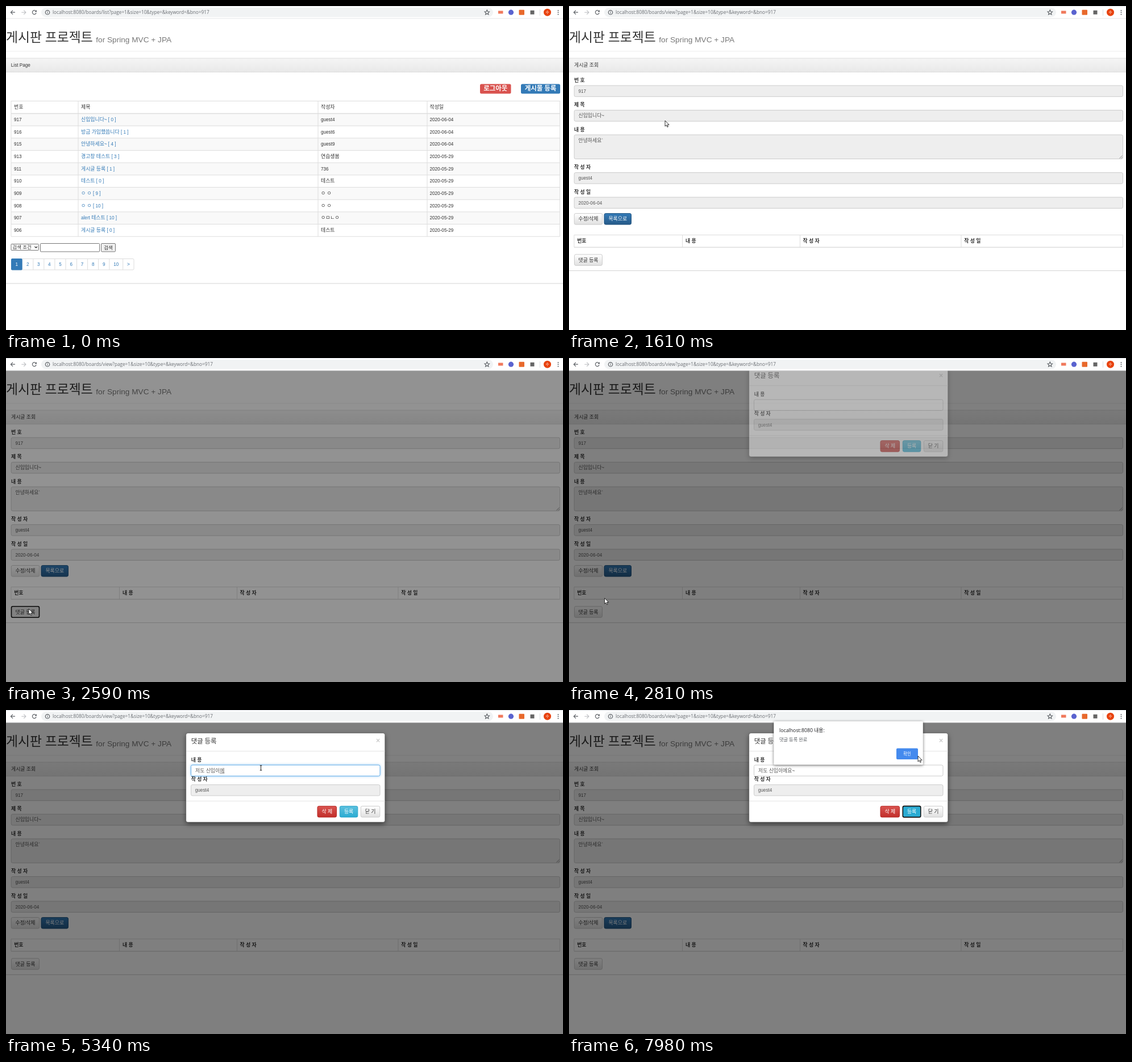
Recreate the animation shown at these times as an HTML page. Size 980 by 571 pixels, loop 8000 ms.

```html
<!DOCTYPE html>
<html lang="ko">
<head>
<meta charset="utf-8">
<title>게시판</title>
<style>
html, body { margin: 0; width: 100%; height: 100%; overflow: hidden; background: #fff; }
svg { display: block; width: 980px; height: 571px; }
text { font: 8.17px "Liberation Sans", "Noto Sans CJK KR", sans-serif; fill: #333; }
.ko { font-size: 1.087em; font-family: "Noto Sans CJK KR", sans-serif; }
.ui { font-family: "Open Sans", "Noto Sans CJK KR", sans-serif; }
.b { font-weight: 700; }
.mid { text-anchor: middle; }
</style>
</head>
<body>
<svg id="stage" viewBox="0 0 980 571" xmlns="http://www.w3.org/2000/svg"></svg>
<script>
const stage = document.getElementById('stage');
const $ = id => document.getElementById(id);

// Hangul runs are set slightly larger so that a syllable is one em wide.
const ko = s => s.replace(/&/g, '&amp;').replace(/>/g, '&gt;')
  .replace(/[ㄱ-힣]+/g, '<tspan class="ko">$&</tspan>');
const text = (x, y, s, o = {}) =>
  `<text x="${x}" y="${y}" class="${o.cls || ''}" id="${o.id || ''}" style="${o.size ? `font-size:${o.size}px;` : ''}${o.fill ? `fill:${o.fill};` : ''}${o.css || ''}">${ko(s)}</text>`;
const rect = (x, y, w, h, fill, stroke = 'none', rx = 0, more = '') =>
  `<rect x="${x}" y="${y}" width="${w}" height="${h}" fill="${fill}" stroke="${stroke}" rx="${rx}" ${more}/>`;
const hline = (x1, x2, y, color = '#ddd', w = 1) =>
  `<path d="M${x1} ${y}H${x2}" stroke="${color}" stroke-width="${w}"/>`;
const vline = (x, y1, y2, color = '#ddd') => `<path d="M${x} ${y1}V${y2}" stroke="${color}"/>`;
const group = (id, body, more = '') => `<g id="${id}" ${more}>${body}</g>`;
const button = (x, y, w, label, fill, border, color, id = '') =>
  rect(x, y, w, 19.5, fill, border, 2.5, id && `id="${id}"`) +
  text(x + w / 2, y + 12.8, label, { cls: 'mid', fill: color });
const field = (x, y, w, h, value) =>
  rect(x, y, w, h, '#eee', '#ccc', 2.5) + text(x + 7.3, y + 12.7, value, { fill: '#555' });

const LINK = '#337ab7', ROW = 21.67, TOP = 189.5;
const WRITER = 'guest4';
const URL_HEAD = 'localhost:8080/boards/', URL_TAIL = '?page=1&size=10&type=&keyword=&bno=917';

const posts = [
  [917, '신입입니다~ [ 0 ]', WRITER], [916, '방금 가입했씁니다 [ 1 ]', 'guest6'],
  [915, '안녕하세요~ [ 4 ]', 'guest9'], [913, '경고창 테스트 [ 3 ]', '연습생봄'],
  [911, '게시글 등록 [ 1 ]', '736'], [910, '테스트 [ 0 ]', '테스트'],
  [909, 'ㅇ ㅇ [ 9 ]', 'ㅇ ㅇ'], [908, 'ㅇ ㅇ [ 10 ]', 'ㅇ ㅇ'],
  [907, 'alert 테스트 [ 10 ]', 'ㅇㅁㄴㅇ'], [906, '게시글 등록 [ 0 ]', '테스트']
];

const gradients = {
  head: ['#f5f5f5', '#e8e8e8'], plain: ['#fff', '#e0e0e0'], blue: [LINK, '#265a88'],
  red: ['#d9534f', '#c12e2a'], cyan: ['#5bc0de', '#2aabd2']
};
const defs = () => '<defs>' + Object.entries(gradients).map(([id, [a, b]]) =>
  `<linearGradient id="${id}" x2="0" y2="1"><stop stop-color="${a}"/><stop offset="1" stop-color="${b}"/></linearGradient>`).join('') +
  `<clipPath id="view">${rect(0, 22, 980, 549, '#fff')}</clipPath></defs>`;

function browserBar() {
  const dark = 'fill="none" stroke="#5f6368" stroke-width="1.2"';
  return rect(0, 0, 980, 22, '#fff') + rect(0, 0, 980, 1, '#dee1e6') + hline(0, 980, 22, '#e4e5e7') +
    rect(62, 3, 795, 16.5, '#f1f3f4', 'none', 8.2) +
    `<path d="M16 11.2H8.6M12 7.6L8.4 11.2L12 14.8" ${dark} stroke="#444"/>` +
    `<path d="M27.3 11.2H34.7M31.3 7.6L34.9 11.2L31.3 14.8" fill="none" stroke="#bbbdc0" stroke-width="1.1"/>` +
    `<g id="reload"><path d="M52.6 8.9A3.5 3.5 0 1 0 53.2 12.3" ${dark}/><path d="M54 7V10.6H50.4Z" fill="#5f6368"/></g>` +
    `<path id="halt" d="M46.4 7.9L53 14.5M53 7.9L46.4 14.5" ${dark}/>` +
    `<circle cx="73" cy="11.3" r="3.7" ${dark} stroke-width=".9"/><path d="M73 10.7V13.4M73 9V10" stroke="#5f6368"/>` +
    text(82, 14.3, '', { id: 'url', cls: 'ui', size: 8.22, fill: '#6a6e73' }) +
    `<path d="M846.3 7L847.5 9.8L850.5 10.1L848.2 12.1L848.9 15.1L846.3 13.5L843.7 15.1L844.4 12.1L842.1 10.1L845.1 9.8Z" ${dark} stroke-width=".9"/>` +
    rect(866, 8.5, 8.5, 5, '#f0795c') + '<circle cx="888.5" cy="11.2" r="4.6" fill="#5a63cf"/>' +
    rect(902.5, 6.8, 9.5, 9, '#e8692c', 'none', 1) + rect(922.5, 7.8, 7, 7, '#666') +
    vline(939.5, 6, 17, '#dcdde0') + '<circle cx="952.5" cy="11.2" r="6.5" fill="#e8430f"/>' +
    text(952.5, 13.4, '수', { cls: 'mid', size: 5.5, fill: '#fff' }) +
    [7.9, 11.3, 14.7].map(y => `<circle cx="971.5" cy="${y}" r="1" fill="#5f6368"/>`).join('');
}

const pageHead = () =>
  text(0, 63.3, '게시판 프로젝트', { size: 21, css: 'font-weight:300' }) +
  text(158.3, 64.4, 'for Spring MVC + JPA', { size: 13.65, fill: '#777' }) +
  hline(0, 980, 79.8, '#eee') + rect(0, 92, 980, 24.5, 'url(#head)') +
  hline(0, 980, 92, '#ddd') + hline(0, 980, 116.5, '#ddd');

function listPage() {
  const end = TOP + ROW * posts.length;
  let s = text(8.8, 107, 'List Page') +
    rect(834, 137.5, 54.5, 17, '#d9534f', 'none', 2.5) + rect(906, 137.5, 69, 17, LINK, 'none', 2.5) +
    text(861.3, 149.2, '로그아웃', { cls: 'b mid', size: 10.5, fill: '#fff' }) +
    text(940.5, 149.2, '게시물 등록', { cls: 'b mid', size: 10.5, fill: '#fff' });
  ['번호', '제목', '작성자', '작성일'].forEach((h, i) => s += text([14, 132, 554, 745.5][i], 180.6, h));
  posts.forEach(([no, title, writer], i) => {
    const y = TOP + ROW * i, base = y + 13.6;
    s += rect(9, y, 965.5, ROW, '#fff', 'none', 0, `id="row${i}"`) + hline(9, 974.5, y, '#ddd', i ? 1 : 1.4) +
      text(14, base, '' + no) + text(132, base, title, { fill: LINK, id: 'link' + i }) +
      text(554, base, writer) + text(745.5, base, i < 3 ? '2020-06-04' : '2020-05-29');
  });
  s += hline(9, 974.5, 167.5) + hline(9, 974.5, end) +
    [9, 127, 549, 741, 974.5].map(x => vline(x, 167, end)).join('');
  s += rect(9, 419.5, 48.5, 11, '#fff', '#767676', 1) + text(11.5, 428, '검색 조건', { size: 7.78 }) +
    '<path d="M50.5 423.8L52.8 426.2L55.1 423.8" fill="none" stroke="#222" stroke-width="1.2"/>' +
    rect(60.5, 418.5, 104, 14.5, '#fff', '#767676', 1) + rect(167.5, 418.5, 25, 14.5, '#efefef', '#767676', 1.5) +
    text(180, 428.6, '검색', { cls: 'mid', size: 7.78 });
  const cuts = [9, 28.7, 47.8, 66.8, 85.9, 105, 124.5, 143.6, 162.7, 181.9, 205.7, 225];
  s += rect(9.5, 445.5, 215.5, 19.5, '#fff', '#ddd', 2) + cuts.slice(2, -1).map(x => vline(x, 445.5, 465)).join('') +
    rect(9, 445, 19.7, 20.4, LINK, 'none', 2);
  cuts.slice(1).forEach((x, i) => s += text((x + cuts[i]) / 2, 458, i < 10 ? '' + (i + 1) : '>',
    { cls: 'mid', fill: i ? LINK : '#fff' }));
  return s + text(9, 484, ',', { id: 'comma' }) + group('listEnd', hline(0, 980, 489, '#d4d4d4', 1.2));
}

function postPage() {
  let s = text(9, 107, '게시글 조회');
  [['번 호', 140.2, '917'], ['제 목', 183.6, '신입입니다~'], ['내 용', 227, '안녕하세요`', 42.5],
   ['작 성 자', 293.6, WRITER], ['작 성 일', 337, '2020-06-04']].forEach(([name, y, value, h = 19.5]) =>
    s += text(9, y - 6.4, name, { cls: 'b' }) + field(9.2, y, 965.3, h, value));
  s += '<path d="M968.5 268.5L973.5 263.5M971.3 268.5L973.5 266.3" stroke="#777" stroke-width=".8"/>' +
    button(9.3, 365.6, 49.5, '수정/삭제', 'url(#plain)', '#ccc') +
    button(62, 365.6, 47.5, '목록으로', 'url(#blue)', '#245580', '#fff') +
    hline(9, 974.5, 403.5) + hline(9, 974.5, 425.2, '#ddd', 1.5) +
    [9, 199.5, 406.5, 690, 974.5].map(x => vline(x, 403.5, 425)).join('');
  ['번호', '내 용', '작 성 자', '작 성 일'].forEach((h, i) =>
    s += text([14.2, 205, 411.5, 695.3][i], 416.8, h, { cls: 'b' }));
  return s + button(9.5, 437.8, 49, '댓글 등록', 'url(#plain)', '#ccc', '#333', 'reply') +
    hline(0, 980, 466.5, '#d4d4d4', 1.2);
}

const modal = () =>
  rect(316.7, 40.7, 350, 157, '#fff', 'rgba(0,0,0,.3)', 3.5, 'style="filter:drop-shadow(0 3px 4.5px rgba(0,0,0,.5))"') +
  text(325.7, 59.2, '댓글 등록', { size: 10.5 }) +
  text(654.7, 58.3, '×', { cls: 'b mid', size: 12.25, fill: '#ccc' }) +
  hline(317, 666.5, 72.5, '#e5e5e5') + hline(317, 666.5, 160.5, '#e5e5e5') +
  text(325.7, 90.6, '내 용', { cls: 'b' }) +
  rect(325.5, 97, 332.5, 19.3, '#fff', '#ccc', 2.5, 'id="input"') +
  text(333, 109.6, '', { id: 'typed', fill: '#555' }) +
  text(325.7, 125.1, '작 성 자', { cls: 'b' }) + field(325.5, 131.7, 332.5, 19.3, WRITER) +
  button(548, 169.4, 33.5, '삭 제', 'url(#red)', '#b92c28', '#fff') +
  button(587.3, 169.4, 31.5, '등록', 'url(#cyan)', '#28a4c9', '#fff', 'save') +
  button(624.3, 169.4, 33.5, '닫 기', 'url(#plain)', '#ccc');

const alertBox = () =>
  rect(360.3, 20, 262.5, 76.5, '#fff', 'none', 1.5, 'style="filter:drop-shadow(0 1px 2.5px rgba(0,0,0,.55))"') +
  `<text class="ui" x="370" y="38.9" style="font-size:8.75px;fill:#202124">localhost:8080 내용:</text>` +
  text(370, 55.4, '댓글 등록 완료', { cls: 'ui', size: 7.58, fill: '#5f6368' }) +
  rect(576, 67.5, 38, 19.5, '#448aee', 'none', 2) +
  text(595, 79.8, '확인', { cls: 'mid', size: 7, fill: '#fff' });

const cursors = () => group('cursor',
  '<path id="arrow" d="M0 0V10L2.3 7.9L3.9 11.4L5.5 10.7L4 7.3H7.1Z" fill="#fff" stroke="#000" stroke-width=".8"/>' +
  '<path id="hand" d="M-1 1Q0 -.6 1 1V5L5 5.7Q6.5 6.2 6.3 8L5.4 12.8H-.3L-3.6 8.5Q-3.6 6.7 -1 8Z" fill="#fff" stroke="#000" stroke-width=".9"/><path/>' +
  '<path id="beam" d="M-1.8 -4.2H1.8M0 -4.2V4.2M-1.8 4.2H1.8" stroke="#222" fill="none"/>');

stage.innerHTML = defs() + group('page', pageHead() + group('list', listPage()) + group('post', postPage())) +
  group('status', rect(-1, 559.5, 92, 13, '#dee1e6', '#c8cacd', 1) +
    text(2, 568.5, URL_HEAD + '917', { cls: 'ui', size: 6.85, fill: '#444' })) +
  rect(0, 22, 980, 549, '#000', 'none', 0, 'id="shade"') +
  group('clip', group('modal', modal()), 'clip-path="url(#view)"') +
  browserBar() + group('alert', alertBox()) + cursors();

const LOOP = 8000, TICK = 109.7;
const path = [
  [0, 928, 548], [7, 169, 202], [13, 169, 202], [19, 40, 442], [23, 40, 442], [30, 448.5, 102],
  [57, 448.5, 102], [61, 604, 173], [64, 604, 173], [67, 575, 318], [70, 607, 83], [71, 614, 81]
];
const typing = [
  [36, '제'], [37, '저'], [38, '저도'], [39, '저도 '], [40, '저도 시'], [41, '저도 신'], [42, '저도 신이'],
  [43, '저도 신입'], [44, '저도 신입이'], [45, '저도 신입잉'], [46, '저도 신입이에'], [51, '저도 신입이에요'], [55, '저도 신입이에요~']
];
const clamp = v => Math.max(0, Math.min(1, v));
const show = (id, on) => $(id).style.display = on ? '' : 'none';
const set = (id, attrs) => Object.entries(attrs).forEach(([k, v]) => $(id).setAttribute(k, v));

function cursorAt(k) {
  const i = Math.max(1, path.findIndex(p => p[0] >= k));
  const [a, x, y] = path[i - 1], [b, x2, y2] = path[i];
  const p = clamp((k - a) / (b - a)), e = p * p * (3 - 2 * p);
  return [x + (x2 - x) * e, y + (y2 - y) * e];
}

function typedAt(k) {
  const step = typing.filter(s => s[0] <= k).pop();
  if (!step) return '';
  const s = step[1];
  if (/[~ ]$/.test(s)) return ko(s);
  return ko(s.slice(0, -1)) + `<tspan text-decoration="underline">${ko(s.slice(-1))}</tspan>`;
}

let last;
function draw(t) {
  const k = Math.min(71, Math.floor((t - 175) / TICK));
  if (k === last) return;
  last = k;
  const onPost = k >= 12, [x, y] = cursorAt(k), loading = k === 11 || k === 12;

  $('url').innerHTML = ko(URL_HEAD + (k < 11 ? 'list' : 'view') + URL_TAIL);
  show('reload', !loading);
  show('halt', loading);
  show('list', !onPost);
  show('post', onPost);
  show('status', k >= 8 && !onPost);
  show('comma', k >= 10);
  set('listEnd', { transform: `translate(0 ${k >= 10 ? 11.5 : 0})` });

  const hover = k < 0 ? -1 : Math.floor((y - TOP) / ROW);
  posts.forEach((_, i) => set('row' + i, { fill: i === hover ? '#f5f5f5' : i % 2 ? '#fff' : '#f9f9f9' }));
  const linkHot = k >= 7;
  $('link0').style.fill = linkHot ? '#23527c' : LINK;
  $('link0').style.textDecoration = linkHot ? 'underline' : 'none';

  const pressed = k >= 20 && k < 24;
  set('reply', { fill: pressed ? '#e0e0e0' : 'url(#plain)', stroke: pressed ? '#111' : '#ccc', 'stroke-width': pressed ? 1.6 : 1 });
  set('shade', { opacity: 0.5 * clamp((k - 20.836) * TICK / 150) });

  const age = (k - 23.4) * TICK, left = 1 - clamp(age / 300);
  show('modal', age > 0);
  set('modal', { opacity: clamp(age / 150), transform: `translate(0 ${-39 * left * left})` });
  const focus = k >= 31 && k < 63;
  set('input', { stroke: focus ? '#66afe9' : '#ccc' });
  $('input').style.filter = focus ? 'drop-shadow(0 0 2px rgba(102,175,233,.7))' : '';
  $('typed').innerHTML = typedAt(k);
  const saved = k >= 63;
  set('save', { fill: k >= 60 ? '#2aabd2' : 'url(#cyan)', stroke: saved ? '#111' : '#28a4c9', 'stroke-width': saved ? 1.6 : 1 });
  show('alert', k >= 65);

  const shape = (k >= 7 && k < 12) || (k >= 60 && k < 65) ? 'hand' : k >= 30 && k < 59 ? 'beam' : 'arrow';
  ['arrow', 'hand', 'beam'].forEach(id => show(id, id === shape));
  show('cursor', k >= 0);
  set('cursor', { transform: `translate(${x} ${y})` });
}

const start = performance.now();
function frame() {
  draw((performance.now() - start) % LOOP);
  requestAnimationFrame(frame);
}
frame();
</script>
</body>
</html>
```
